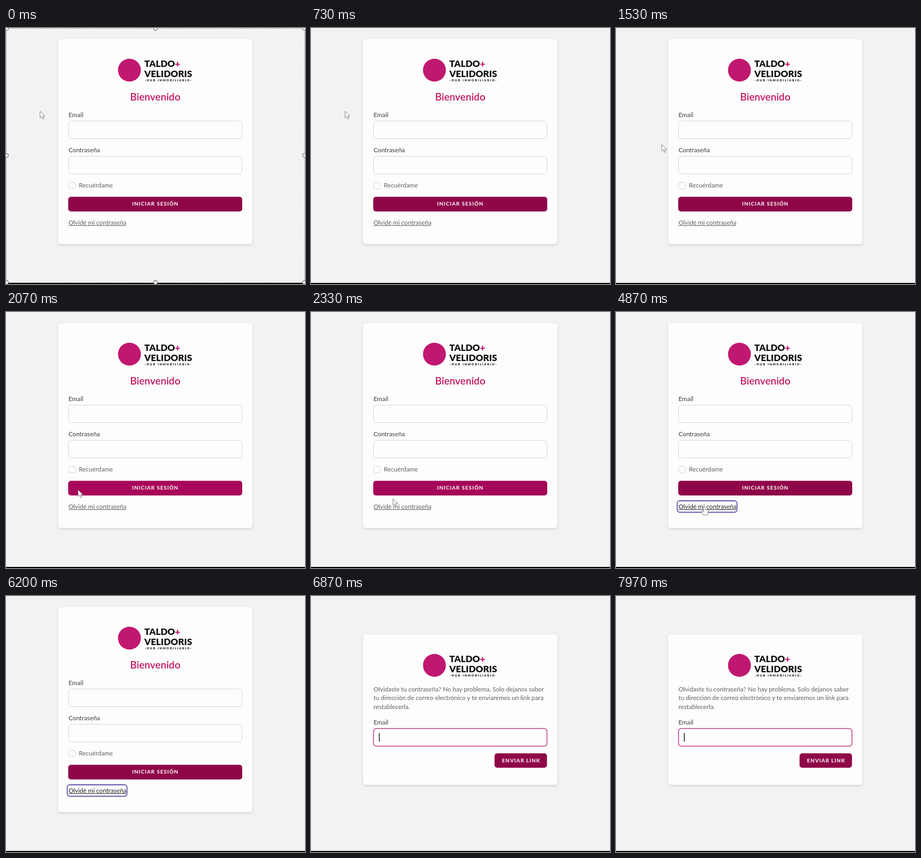
Animation of 562 by 480 pixels, one loop 8 s. Source, as an HTML page:

```html
<!DOCTYPE html>
<html lang="es">
<head>
<meta charset="utf-8">
<title>Acceso</title>
<style>
  html, body { margin: 0; width: 100%; height: 100%; overflow: hidden; background: #f2f2f2; }
  svg { display: block; width: 562px; height: 480px; }
  text { font: 11.75px Lato, sans-serif; fill: #3a3a40; }
  .soft { fill: #5e5e62; }
  .title { font-size: 19.1px; font-weight: 600; fill: #c01860; }
  .brand { font-size: 17.2px; font-weight: 900; fill: #101010; }
  .brand tspan { fill: #c01870; }
  .tag { font-size: 5.4px; font-weight: 900; letter-spacing: 1.9px; fill: #101010; }
  .caps { font-size: 9.8px; font-weight: 800; letter-spacing: 1px; fill: #faf2f6; }
  .card { fill: #fdfdfd; filter: drop-shadow(0 2px 2px rgba(60, 60, 80, .17)); }
  .box { fill: #fdfdfd; stroke: #d6d6da; }
  .btn { fill: #8f0648; }
  .cursor { fill: #fdfdfd; stroke: #77777c; stroke-width: .9; stroke-linejoin: round; }
  .handle { fill: #fdfdfd; stroke: #77777c; stroke-width: 1.3; }
</style>
</head>
<body>
<svg viewBox="0 0 562 480">
  <defs>
    <g id="logo">
      <circle cx="232" cy="79" r="21.5" fill="#c01870"/>
      <text class="brand" x="260" y="72.5">TALDO<tspan>+</tspan></text>
      <text class="brand" x="260" y="91.5">VELIDORIS</text>
      <text class="tag" x="261" y="100">·HUB INMOBILIARIO·</text>
    </g>
  </defs>

  <rect width="562" height="480" fill="#000"/>
  <rect width="562" height="478" fill="#f2f2f2"/>

  <g id="login">
    <rect class="card" x="98" y="21" width="365" height="384" rx="5"/>
    <use href="#logo"/>
    <text class="title" x="280.5" y="135.5" text-anchor="middle">Bienvenido</text>
    <text x="117.5" y="167">Email</text>
    <rect class="box" x="117.5" y="174.5" width="326" height="33" rx="5"/>
    <text x="117.5" y="233">Contraseña</text>
    <rect class="box" x="117.5" y="240.5" width="326" height="33" rx="5"/>
    <rect class="box" x="118" y="289.5" width="12.5" height="12" rx="3"/>
    <text class="soft" x="137" y="299">Recuérdame</text>
    <rect id="enter" class="btn" x="117" y="316.5" width="327" height="27.5" rx="5"/>
    <text class="caps" x="237" y="333">INICIAR SESIÓN</text>
    <rect id="ring" x="115" y="354" width="112.5" height="21.5" rx="5" fill="none" stroke="#6058b0" stroke-width="1.8"/>
    <g id="link">
      <text x="117.5" y="368.5" style="fill:inherit">Olvidé mi contraseña</text>
      <rect x="117.5" y="370" width="108" height="1"/>
    </g>
  </g>

  <g id="reset">
    <rect class="card" x="98" y="72" width="365" height="282" rx="5"/>
    <use href="#logo" y="51"/>
    <text class="soft" x="117.5" y="178.5">Olvidaste tu contraseña? No hay problema. Solo dejanos saber</text>
    <text class="soft" x="117.5" y="195">tu dirección de correo electrónico y te enviaremos un link para</text>
    <text class="soft" x="117.5" y="211.5">restablecerla.</text>
    <text x="117.5" y="241">Email</text>
    <rect x="117.5" y="248.5" width="326" height="33" rx="5" fill="#fdfdfd" stroke="#bd3f80" stroke-width="1.5"/>
    <rect id="caret" x="127.7" y="257" width="1.4" height="16" fill="#111"/>
    <rect class="btn" x="345" y="295" width="98.5" height="27" rx="5"/>
    <text class="caps" x="359" y="312">ENVIAR LINK</text>
  </g>

  <path id="arrow" class="cursor" d="M0 0V12.5L3 9.8L5 14.8L7.3 13.8L5.2 9.2H9.2Z"/>
  <path id="hand" class="cursor" d="M-1.5 8V1Q0-1 1.5 1V6L5.5 7Q7.5 7.5 7.5 9.5L6.5 14L5.5 17H-1.5L-3 14L-5.5 10.5Q-5.5 8.5-3.5 9L-1.5 11Z"/>

  <g id="frame">
    <rect x=".5" y=".5" width="561" height="477" fill="none" stroke="#77777c" stroke-dasharray="2 2"/>
    <circle class="handle" cx="1" cy="1" r="3.5"/>
    <circle class="handle" cx="281" cy="1" r="3.5"/>
    <circle class="handle" cx="561" cy="1" r="3.5"/>
    <circle class="handle" cx="1" cy="239" r="3.5"/>
    <circle class="handle" cx="561" cy="239" r="3.5"/>
    <circle class="handle" cx="1" cy="477" r="3.5"/>
    <circle class="handle" cx="281" cy="477" r="3.5"/>
    <circle class="handle" cx="561" cy="477" r="3.5"/>
  </g>
</svg>
<script>
const LOOP = 8000, SWITCH = 6600, OVER_LINK = 2460, HAND_GONE = 5600;
// time, x, y of the pointer tip
const path = [[1000, 64, 156], [1530, 86, 218], [1800, 116, 316], [2330, 154, 350], [2640, 166, 364]];

const $ = id => document.getElementById(id);
const show = (id, on) => $(id).style.display = on ? '' : 'none';
const ramp = (t, from, span) => Math.min(1, Math.max(0, (t - from) / span));

function pointer(t) {
  let [, x, y] = path[0];
  for (let i = 1; i < path.length; i++) {
    const [t0, x0, y0] = path[i - 1], [t1, x1, y1] = path[i];
    const k = ramp(t, t0, t1 - t0);
    x += (x1 - x0) * k;
    y += (y1 - y0) * k;
  }
  return `translate(${x} ${y})`;
}

function draw(t) {
  const onLink = t >= OVER_LINK;
  show('frame', t < 30);
  show('login', t < SWITCH);
  show('reset', t >= SWITCH);
  show('ring', t >= 3500);
  show('arrow', !onLink);
  show('hand', onLink && t < HAND_GONE);
  show('caret', (t - SWITCH) % 1000 < 500);

  const place = pointer(t);
  $('arrow').setAttribute('transform', place);
  $('hand').setAttribute('transform', place);

  const hover = ramp(t, 1830, 150) - ramp(t, 2320, 150);
  $('enter').style.fill = `rgb(${143 + 25 * hover}, 6, ${72 + 18 * hover})`;
  $('link').style.fill = onLink ? '#222226' : '#5e5e62';
}

const start = performance.now();
(function tick() {
  draw((performance.now() - start) % LOOP);
  requestAnimationFrame(tick);
})();
</script>
</body>
</html>
```
